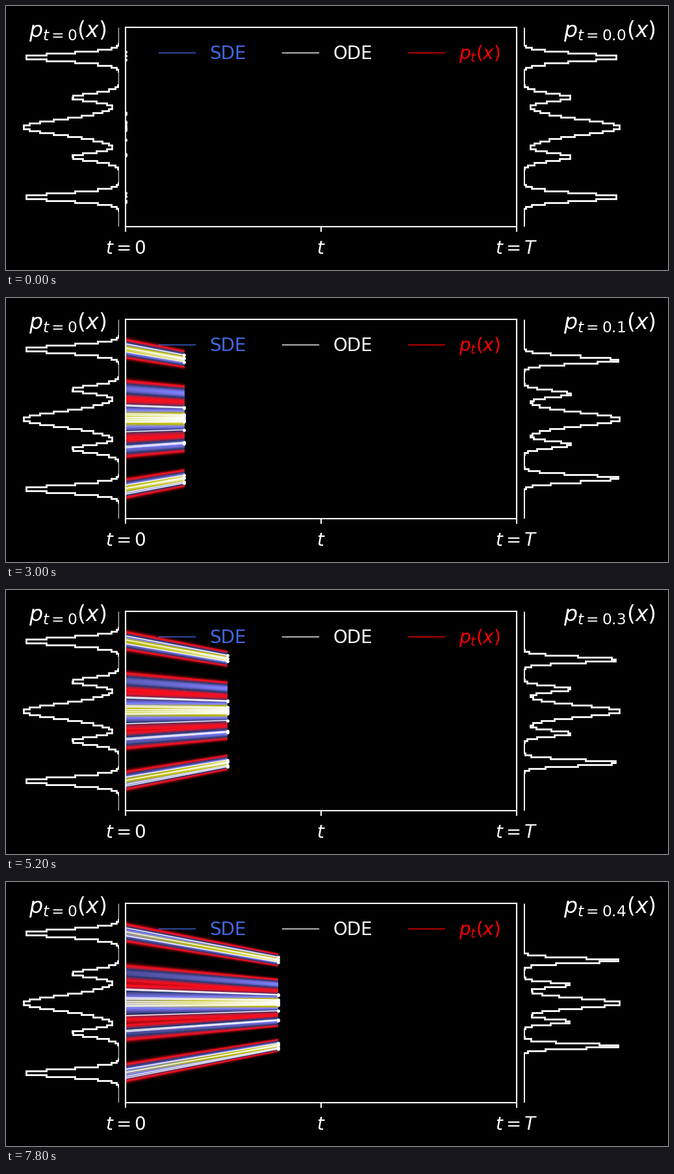
Recreate the animation shown at these times as a matplotlib script. Size 1019 by 408 pixels, loop 8000 ms.

```python
import numpy as np
import matplotlib.pyplot as plt
from matplotlib.animation import FuncAnimation

W, H, DPI = 1019, 408, 100
FRAMES, INTERVAL = 40, 200
STEPS = 100            # time steps across the whole plot
SUB = 6                # field columns per time step
BINS, FINE = 100, 12

# Main plot box in pixels
LEFT, RIGHT, TOP, BOTTOM = 184, 786, 33, 341
HALF = (BOTTOM - TOP) / 2

MIXTURE = [(-0.7, 0.04, 0.2), (-0.3, 0.04, 0.1), (0.0, 0.08, 0.4),
           (0.3, 0.04, 0.1), (0.7, 0.04, 0.2)]   # mean, sigma, weight

# Starting offsets of the ODE paths, in pixels above the centre
STARTS = np.array([116.3, 110, 104, 21.7, 20.1, 8.3, 6.1, 2.2, -0.6, -3.2,
                   -5.2, -19.7, -42.4, -44.4, -102.3, -107.3, -113.8,
                   -116.3]) / HALF


def density(x):
    """Mixture density, scaled so that the central peak is 1."""
    total = sum(w / s * np.exp(-0.5 * ((x - m) / s) ** 2)
                for m, s, w in MIXTURE)
    return total / 5.0


def histogram(t):
    """Bin averages at time t, scaled to a maximum of 1."""
    n = BINS * FINE
    x = -1 + (np.arange(n) + 0.5) * 2 / n
    bars = density(x / (1 - t)).reshape(BINS, FINE).mean(axis=1)
    return bars / bars.max()


def build_field():
    """Density over time, with faint sampling streaks along the rays."""
    rng = np.random.default_rng(4)
    grain = rng.normal(size=201)
    t = (np.arange(SUB * FRAMES) + 0.5) / (SUB * STEPS)
    x = -1 + (np.arange(308) + 0.5) * 2 / 308
    ray = x[:, None] / (1 - t)
    p = density(ray)
    streak = np.interp(ray, np.linspace(-1, 1, 201), grain)
    return p * (1 + 0.02 * streak / np.sqrt(p + 0.02)) / (1 - t)


def add_axes(x0, x1):
    return fig.add_axes([x0 / W, 1 - BOTTOM / H,
                         (x1 - x0) / W, (BOTTOM - TOP) / H])


def put_text(x, y, text, size, ha):
    return fig.text(x / W, 1 - y / H, text, color="white", fontsize=size,
                    ha=ha, va="baseline")


def side_histogram(x0, x1, limits):
    side = add_axes(x0, x1)
    side.set_axis_off()
    side.set_xlim(limits)
    side.set_ylim(-1, 1)
    return side.stairs(histogram(0), np.linspace(-1, 1, BINS + 1),
                       orientation="horizontal", color="white", lw=2)


fig = plt.figure(figsize=((W + 1e-6) / DPI, (H + 1e-6) / DPI), dpi=DPI,
                 facecolor="black")

ax = add_axes(LEFT, RIGHT)
ax.set_facecolor("black")
ax.set_xlim(0, 1)
ax.set_ylim(-1, 1)
ax.set_yticks([])
ax.set_xticks([0, 0.5, 1], ["", "", ""])
ax.tick_params(axis="x", length=6, width=1.5, color="white")
for spine in ax.spines.values():
    spine.set(color="white", linewidth=1.5)

field = build_field()
image = ax.imshow(field[:, :SUB], extent=(0, 0.01, -1, 1), origin="lower",
                  aspect="auto", cmap="gist_stern", interpolation="bilinear",
                  zorder=1)
ax.set_xlim(0, 1)
ax.set_ylim(-1, 1)

paths = [ax.plot([], [], color="white", lw=1, zorder=2)[0] for _ in STARTS]
dots, = ax.plot([], [], "o", color="white", ms=3.6, mew=0, zorder=3)

entries = [("SDE", "royalblue"), ("ODE", "white"), ("$p_t(x)$", "red")]
handles = [plt.Line2D([], [], color=c, lw=1) for _, c in entries]
ax.legend(handles, [name for name, _ in entries], loc="upper right", ncol=3,
          fontsize=20, frameon=False, labelcolor=[c for _, c in entries])

side_histogram(16, 174, (158 / 147, 0))
right_bars = side_histogram(796.5, 954.5, (0, 158 / 147))

put_text(LEFT, 383, "$t=0$", 20, "center")
put_text((LEFT + RIGHT) / 2, 383, "$t$", 20, "center")
put_text(RIGHT, 383, "$t=T$", 20, "center")
put_text(35, 48, "$p_{t=0}(x)$", 24, "left")
right_label = put_text(858, 48, "", 24, "left")


def draw(k):
    t = k / STEPS
    ends = STARTS * (1 - t)
    image.set_visible(k > 0)
    if k:
        shown = field[:, :SUB * k]
        image.set_data(shown)
        image.set_extent((0, t, -1, 1))
        image.set_clim(0, shown.max())
    for path, start, end in zip(paths, STARTS, ends):
        path.set_data([0, t], [start, end])
    dots.set_data(np.full(len(ends), t), ends)
    right_bars.set_data(values=histogram(t))
    right_label.set_text(f"$p_{{t={t:.1f}}}(x)$")
    return [image, *paths, dots, right_bars, right_label]


anim = FuncAnimation(fig, draw, frames=FRAMES, interval=INTERVAL, repeat=True,
                     blit=False)
plt.show()
```
